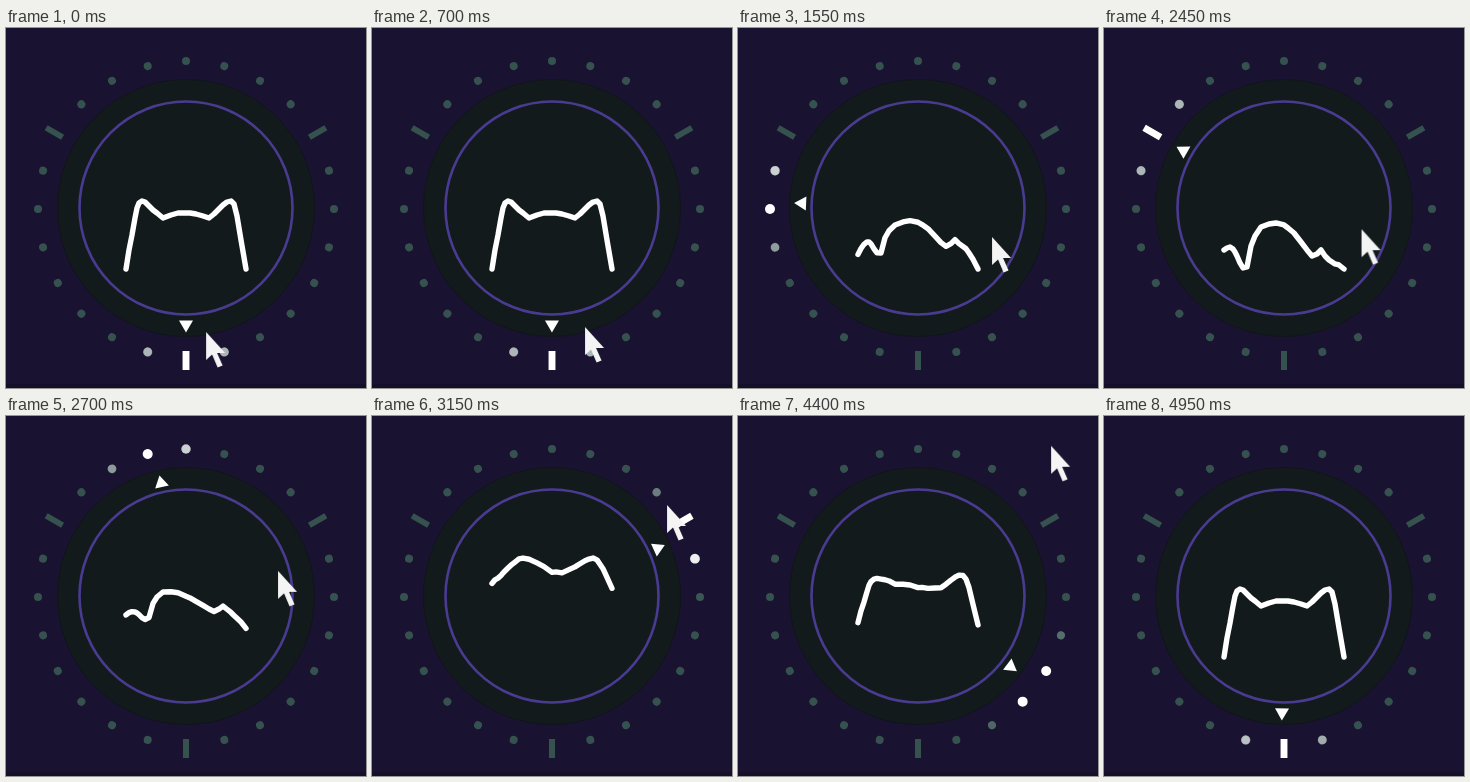
An HTML page without scripts for the animation above (5.3 s loop, 360 px wide and 360 px high).

```html
<!DOCTYPE html>
<html lang="en">
<head>
<meta charset="utf-8">
<title>Morphing dial</title>
<style>
  /* --a: dial angle in degrees, clockwise from the top */
  @property --a { syntax: "<number>"; inherits: true; initial-value: 180; }

  html, body { margin: 0; width: 100%; height: 100%; overflow: hidden; background: #1a1231; }
  body, .outline { animation: turn 5.3s infinite; }
  svg { position: absolute; left: 0; top: 0; }

  .disc { fill: #131a1b; stroke: #10141b; }
  .ring { fill: none; stroke: #4a3b92; stroke-width: 2.6; }
  .outline { fill: none; stroke: #fff; stroke-width: 5.4; stroke-linecap: round; stroke-linejoin: round; }
  .pointer { fill: #fff; transform-origin: 180px 180.5px; transform: rotate(calc(var(--a) * 1deg)); }

  /* Marks around the dial glow as the pointer comes near */
  i {
    --d: calc(var(--a) - var(--t));
    --gap: max(var(--d), -1 * var(--d));
    --near: min(var(--gap), max(360 - var(--gap), var(--gap) - 360));
    --lit: min(1, max(0, (25 - var(--near)) / 17));
    position: absolute; left: 176px; top: 28.5px; width: 8px; height: 8px;
    border-radius: 50%; background: #35524f;
    transform-origin: 4px 152px; transform: rotate(calc(var(--t) * 1deg));
  }
  i::after {
    content: ""; position: absolute; inset: 0; border-radius: inherit; background: #fff;
    opacity: calc(var(--lit)); transform: scale(calc(1 + .25 * var(--lit)));
  }
  i.bar { left: 177px; top: 19px; width: 6px; height: 19px; border-radius: 0; transform-origin: 3px 161.5px; }
  i.bar::after { transform: scaleX(calc(1 + .15 * var(--lit))); }

  .cursor {
    position: absolute; left: 0; top: 0; width: 20px; height: 37px; background: #f4f4f4;
    clip-path: polygon(0 0, 0 28px, 6px 22.5px, 11.5px 35.5px, 16.5px 33.5px, 11px 21px, 19px 21px);
    animation: drag 5.3s linear infinite;
  }

  /* Dial and outline share one easing, so the shape follows the angle */
  @keyframes turn {
    0%, 13.21% {
      --a: 180;
      d: path("M120 241 123 222 126 207 129 190 131 180 133 175 136 173 139 174 143 178 147 182 151 185 157 190 165 187 172 185 180 185 184 185 190 186 197 188 203 190 208 186 213 181 217 177 221 174 225 173 228 176 231 188 235 212 240 241");
    }
    13.21% {
      animation-timing-function: linear(0, .033 8.3%, .117 16.6%, .246 22.1%, .433 27.6%, .675 35.9%, .883 47%, .938 58%, .938 95.3%, 1);
    }
    47.36% {
      --a: 300;
      d: path("M120 222 123 220 126 219 129 221 131 224 133 228 136 235 139 240 143 239 147 218 151 208 157 199 165 196 172 195 180 197 184 200 190 205 197 214 203 222 208 228 213 226 217 222 221 228 225 232 228 234 231 236 235 237 240 241");
      animation-timing-function: linear(0, .396 31.3%, .767 72.4%, 1);
    }
    58.83% {
      --a: 420;
      d: path("M120 164 123 161 126 160 129 158 131 156 133 154 136 151 139 148 143 144.5 147 141 151 140 157 141 165 145 172 149 180 155 184 154.5 190 155.5 197 152 203 149 208 146 213 143 217 141.5 221 140.5 225 142.5 228 147 231 151 235 159 240 169");
      animation-timing-function: linear(0, .045 1.7%, .07 7.2%, .087 18.1%, .087 56.9%, .207 61.8%, .554 70%, .76 78.2%, .9 86.4%, .975 94.5%, 1);
    }
    93.4%, 100% {
      --a: 541;
      d: path("M120 241 123 222 126 207 129 190 131 180 133 175 136 173 139 174 143 178 147 182 151 185 157 190 165 187 172 185 180 185 184 185 190 186 197 188 203 190 208 186 213 181 217 177 221 174 225 173 228 176 231 188 235 212 240 241");
    }
  }

  @keyframes drag {
    0% { transform: translate(200px, 304px); }
    2.83%, 13.21% { transform: translate(213px, 299px); }
    18.87% { transform: translate(219px, 286px); }
    20.75% { transform: translate(226px, 271px); }
    22.64% { transform: translate(233px, 253px); }
    29.25% { transform: translate(254px, 209px); }
    33.02%, 45.75% { transform: translate(256px, 206px); }
    50.94% { transform: translate(272px, 155px); }
    59.43% { transform: translate(295px, 89px); }
    65%, 78.5% { transform: translate(297px, 85px); }
    83.02% { transform: translate(313px, 30px); }
    84.9% { transform: translate(322px, 9px); opacity: 1; }
    85.85% { transform: translate(322px, 9px); opacity: 1; animation-timing-function: step-start; }
    85.86%, 100% { transform: translate(322px, 9px); opacity: 0; }
  }
</style>
</head>
<body>
<svg width="360" height="360" viewBox="0 0 360 360">
  <rect y="356" width="360" height="4" fill="#160f2a"/>
  <circle class="disc" cx="180" cy="180" r="128.5"/>
  <circle class="ring" cx="180" cy="180" r="106.5"/>
  <path class="outline"/>
  <path class="pointer" d="M180 56.5 187 68.5H173Z"/>
</svg>

<i style="--t:180" class="bar"></i><i style="--t:195"></i><i style="--t:210"></i><i style="--t:225"></i>
<i style="--t:240"></i><i style="--t:255"></i><i style="--t:270"></i><i style="--t:285"></i>
<i style="--t:300" class="bar"></i><i style="--t:315"></i><i style="--t:330"></i><i style="--t:345"></i>
<i style="--t:360"></i><i style="--t:375"></i><i style="--t:390"></i><i style="--t:405"></i>
<i style="--t:420" class="bar"></i><i style="--t:435"></i><i style="--t:450"></i><i style="--t:465"></i>
<i style="--t:480"></i><i style="--t:495"></i><i style="--t:510"></i><i style="--t:525"></i>

<div class="cursor"></div>
</body>
</html>
```
